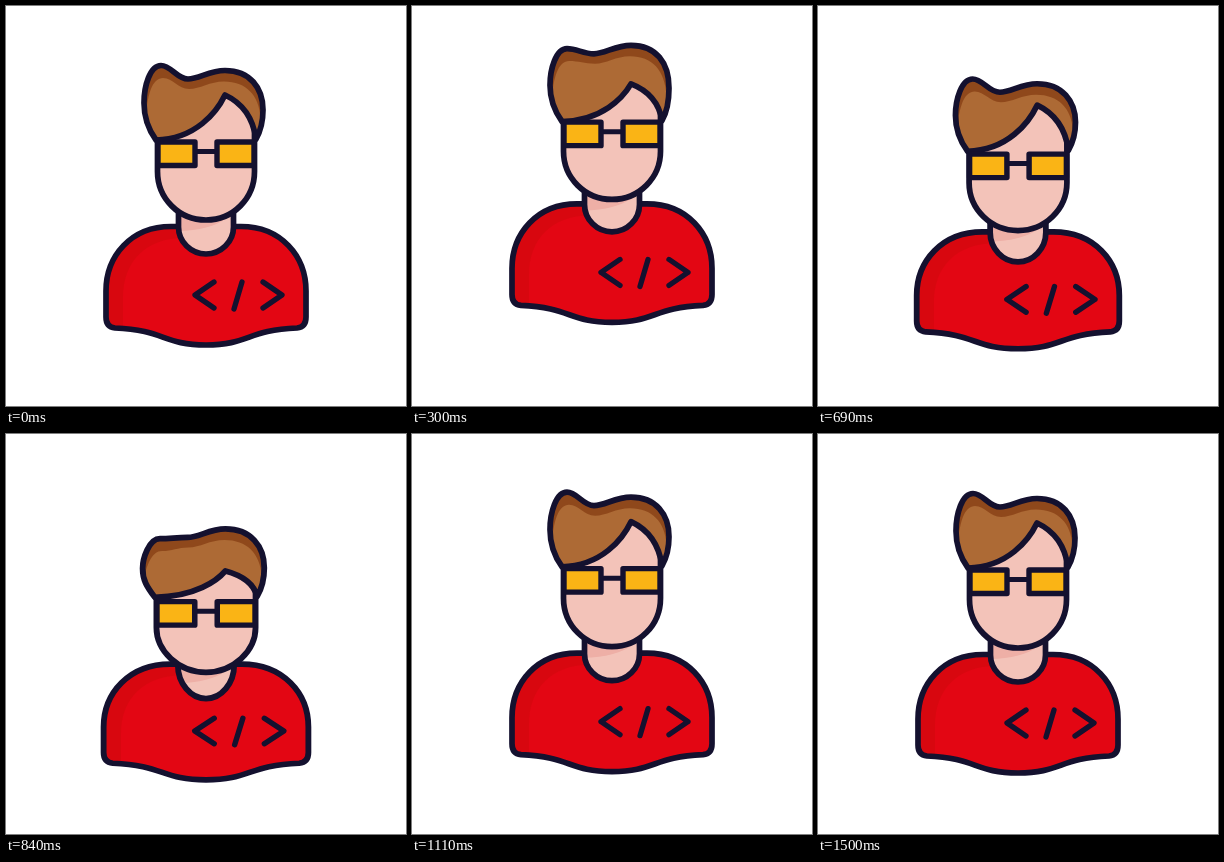
Recreate the animation shown at these times as an HTML page with a canvas. Size 400 px wide and 400 px high, loop 3530 ms.

```html
<!DOCTYPE html>
<html lang="en">
<head>
<meta charset="utf-8">
<title>Jumping coder</title>
<style>
  html, body { margin: 0; width: 100%; height: 100%; overflow: hidden; background: #fff; }
  canvas { display: block; width: 100vw; height: 100vh; }
</style>
</head>
<body>
<canvas id="stage" width="400" height="400"></canvas>
<script>
const ctx = document.getElementById('stage').getContext('2d');
const INK = '#14112f', RED = '#e30613', RED_DARK = '#d8070f';
const SKIN = '#f3c3b9', SKIN_DARK = '#eeafa6', HAIR = '#ad6a35', HAIR_DARK = '#8f481b', LENS = '#fab415';

// Times in ms
const LOOP = 3530, STEP = 30, END = 1500;
const LEAVE = 232, LAND = 632, SPRING = 970, FLASH = 1020;

// How far each part dips and rises, and how late it follows the hem
const PARTS = {
  hem:     { dip: 7.3,  rise: 40, lag: 0 },
  top:     { dip: 10.3, rise: 40, lag: 0 },
  collar:  { dip: 17.5, rise: 44, lag: 9 },
  chin:    { dip: 25.5, rise: 44, lag: 14 },
  glasses: { dip: 33,   rise: 47, lag: 20 },
  fringe:  { dip: 49,   rise: 40, lag: 38 },
  quiff:   { dip: 46.5, rise: 48, lag: 29 },
  crown:   { dip: 32,   rise: 54, lag: 14 }
};

// Crouch, flight, landing squash, then a damped spring
function offset({ dip, rise, lag }, t) {
  const up = LEAVE + lag, down = LAND + lag;
  if (t >= END) return 0;
  if (t < up) return dip * Math.sin(Math.PI * (t / up) ** 1.3);
  if (t < down) return -rise * (1 - (2 * (t - up) / (down - up) - 1) ** 2);
  if (t < SPRING) return dip * Math.sin(Math.PI * (t - down) / (SPRING - down));
  const s = t - SPRING;
  return -6.5 * Math.exp(-s / 150) * Math.sin(Math.PI * s / 170);
}

function paint(path, fill, width = 5.7) {
  if (fill) {
    ctx.fillStyle = fill;
    ctx.fill(path);
  }
  if (width) {
    ctx.lineWidth = width;
    ctx.stroke(path);
  }
}

function within(path, draw) {
  ctx.save();
  ctx.clip(path);
  draw();
  ctx.restore();
}

function widen(s, draw) {
  ctx.save();
  ctx.translate(200, 0);
  ctx.scale(s, 1);
  ctx.translate(-200, 0);
  draw();
  ctx.restore();
}

function drawBody({ hem, top }) {
  const y = v => v + top + (hem - top) * (v - 221) / 118;
  const shirt = new Path2D(`M172 ${y(220.5)} H165 C125 ${y(220.5)} 100 ${y(250)} 100 ${y(285)}
    V${y(311)} Q100 ${y(321)} 109 ${y(322)} C159 ${y(324)} 157 ${y(339)} 200 ${y(339)}
    C243 ${y(339)} 241 ${y(324)} 291 ${y(322)} Q300 ${y(321)} 300 ${y(311)}
    V${y(285)} C300 ${y(250)} 275 ${y(220.5)} 235 ${y(220.5)} Z`);
  paint(shirt, RED_DARK, 0);
  within(shirt, () => paint(new Path2D(`M117 ${y(345)} V${y(292)}
    C117 ${y(255)} 140 ${y(232)} 178 ${y(232)} L235 ${y(210)} H310 V${y(345)} Z`), RED, 0));
  paint(shirt);
  paint(new Path2D(`M208 ${y(276)} L189 ${y(289)} L208 ${y(302)}
    M236 ${y(276)} L228 ${y(303)} M257 ${y(276)} L276 ${y(289)} L257 ${y(302)}`), null, 5.3);
}

function drawNeck({ top, collar, chin }) {
  const side = 221 + top, low = 248 + collar, bend = (low - side) * 0.55;
  const neck = new Path2D(`M172.5 ${195 + chin} V${side}
    C172.5 ${side + bend} 185 ${low} 200 ${low} C215 ${low} 227.5 ${side + bend} 227.5 ${side}
    V${195 + chin}`);
  paint(neck, SKIN, 0);
  within(neck, () => paint(new Path2D(`M170 ${195 + chin} V${225 + chin}
    Q203 ${225 + chin} 221 ${212 + chin} V${195 + chin} Z`), SKIN_DARK, 0));
  paint(neck);
}

function drawFace({ chin, glasses, fringe }) {
  const cheek = 165.5 + (glasses + chin) / 2;
  paint(new Path2D(`M151.5 ${89 + fringe} V${cheek}
    C151.5 ${192.5 + chin} 173 ${214 + chin} 200 ${214 + chin}
    C227 ${214 + chin} 248.5 ${192.5 + chin} 248.5 ${cheek} V${89 + fringe}`), SKIN);
}

function drawHair({ glasses, fringe, quiff, crown }) {
  const base = glasses * 0.93, left = (base + quiff) / 2, right = (base + crown) / 2;
  const b = v => v + base, q = v => v + quiff, c = v => v + crown;
  const tip = 89 + fringe, lock = part => tip + (b(133) - tip) * part;
  const hair = new Path2D(`M150 ${b(134)} C142 ${b(123)} 138 ${109 + left} 138 ${97 + left}
    C138 ${q(80)} 144 ${q(59.5)} 155 ${q(59.5)} C165 ${q(59.5)} 171 ${c(73)} 182 ${c(73)}
    C193 ${c(73)} 203 ${c(64.5)} 219 ${c(64.5)} C244 ${c(64.5)} 257 ${c(82)} 257 ${104 + right}
    C257 ${b(118)} 254 ${b(126)} 250 ${b(133)}
    C247 ${lock(0.52)} 236 ${lock(0.18)} 219 ${tip}
    C211 ${lock(0.38)} 190 ${b(133)} 150 ${b(134)} Z`);
  paint(hair, HAIR_DARK, 0);
  within(hair, () => paint(new Path2D(`M141 ${b(145)} V${100 + left}
    C143 ${q(86)} 147 ${q(72)} 157 ${q(72)} C167 ${q(72)} 172 ${c(83)} 183 ${c(83)}
    C194 ${c(83)} 204 ${c(75.5)} 218 ${c(75.5)} C240 ${c(75.5)} 253 ${c(89)} 254.5 ${112 + right}
    V${b(145)} Z`), HAIR, 0));
  paint(hair);
}

function drawGlasses({ glasses }) {
  const y = 136 + glasses;
  paint(new Path2D(`M189 ${y + 9.5} H211`), null, 5);
  for (const x of [152, 211]) {
    const lens = new Path2D();
    lens.rect(x, y, 37, 23.5);
    paint(lens, LENS, 5.4);
  }
}

function render(now) {
  const t = Math.floor((now % LOOP) / STEP) * STEP;
  const pose = {};
  for (const name in PARTS) pose[name] = offset(PARTS[name], t);
  ctx.fillStyle = t === FLASH ? '#000' : '#fff';
  ctx.fillRect(0, 0, 400, 400);
  ctx.strokeStyle = INK;
  ctx.lineJoin = ctx.lineCap = 'round';
  widen(1 + Math.max(0, pose.hem) * 0.0035, () => {
    drawBody(pose);
    drawNeck(pose);
  });
  widen(1 + Math.max(0, pose.glasses) * 0.0007, () => {
    drawFace(pose);
    drawHair(pose);
    drawGlasses(pose);
  });
}

const start = performance.now();
function tick() {
  render(performance.now() - start);
  requestAnimationFrame(tick);
}
tick();
</script>
</body>
</html>
```
